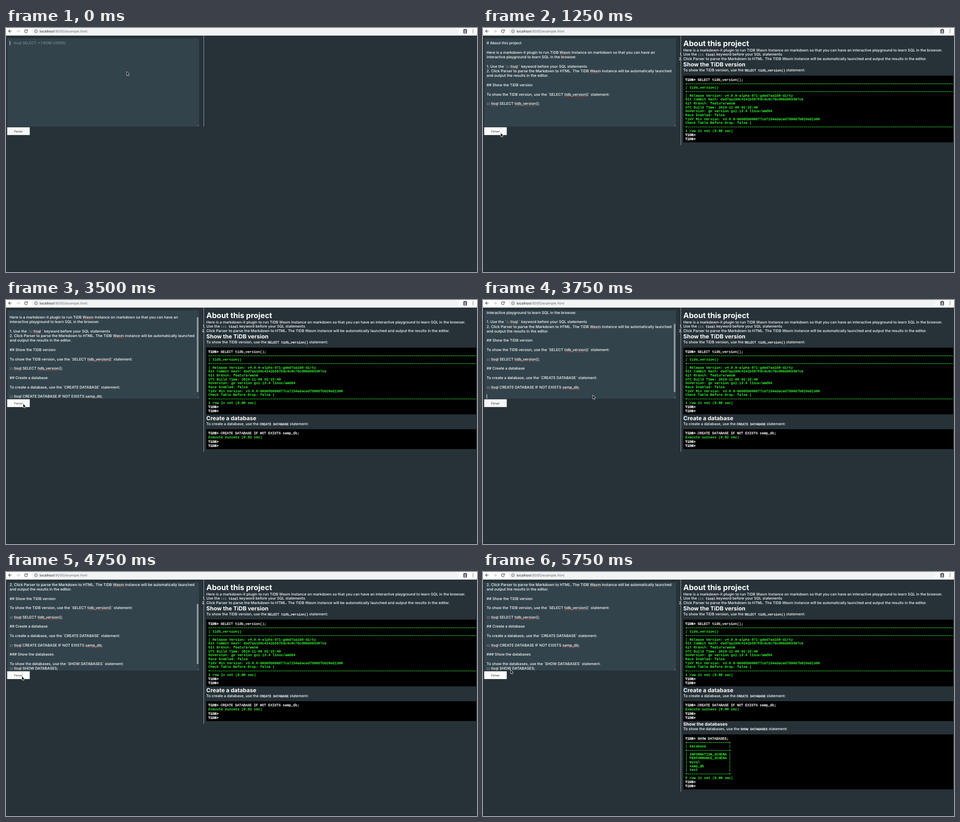
Write an HTML page with a canvas that moves like this. It is 1037 px wide and 540 px high and loops after 6 s.

```html
<!DOCTYPE html>
<html lang="en">
<head>
<meta charset="utf-8">
<title>Markdown SQL playground</title>
<style>
html, body { margin: 0; width: 100%; height: 100%; overflow: hidden; background: #263238; }
canvas { display: block; width: 1037px; height: 540px; }
</style>
</head>
<body>
<canvas id="stage"></canvas>
<script>
const W = 1037, H = 540, LOOP = 6000;
const canvas = document.getElementById('stage');
const ctx = canvas.getContext('2d');
const dpr = window.devicePixelRatio || 1;
canvas.width = W * dpr;
canvas.height = H * dpr;

const SANS = 'Inter, "Open Sans", sans-serif';
const MONO = '"Liberation Mono", "Courier New", monospace';
const BODY = `500 8.2px ${SANS}`;
const CODE = `7.1px ${MONO}`;
const TERM = `7.6px ${MONO}`;
const CHAR = 4.56;
const GREEN = '#33f533';

const SOURCE = `# About this project

Here is a markdown-it plugin to run TiDB Wasm Instance on markdown so that you can have an
interactive playground to learn SQL in the browser.

1. Use the \`::: tisql \` keyword before your SQL statements
2. Click Parser to parse the Markdown to HTML. The TiDB Wasm instance will be automatically launched
and output the results in the editor.

## Show the TiDB version

To show the TiDB version, use the \`SELECT tidb_version()\` statement:

::: tisql SELECT tidb_version();

## Create a database

To create a database, use the \`CREATE DATABASE\` statement:

::: tisql CREATE DATABASE IF NOT EXISTS samp_db;

### Show the databases

To show the databases, use the \`SHOW DATABASES\` statement:
::: tisql SHOW DATABASES;`.split('\n');

const WIDE_RULE = '+' + '-'.repeat(135);
const VERSION_ROWS = [
  WIDE_RULE,
  '| tidb_version()',
  WIDE_RULE,
  '| Release Version: v4.0.0-alpha-671-gded7aa198-dirty',
  'Git Commit Hash: ded7aa198c4141b56759c4c0c78cd09d963387ce',
  'Git Branch: feature/wasm',
  'UTC Build Time: 2019-11-08 02:15:40',
  'GoVersion: go version go1.13.4 linux/amd64',
  'Race Enabled: false',
  'TiKV Min Version: v3.0.0-60965b006877ca7234adaced7890d7b029ed1306',
  'Check Table Before Drop: false |',
  WIDE_RULE,
  '1 row in set (0.00 sec)'
];
const RULE = '+' + '-'.repeat(20) + '+';
const cell = s => `| ${s.padEnd(18)} |`;
const DATABASE_ROWS = [
  RULE, cell('Database'), RULE,
  ...['INFORMATION_SCHEMA', 'PERFORMANCE_SCHEMA', 'mysql', 'samp_db', 'test'].map(cell),
  RULE, '5 row in set (0.00 sec)'
];

// lines: editor lines present; blank: the last of them is still empty
const STATES = [
  { at: 0, lines: 0, caret: true, pointer: [266, 97], sections: 0 },
  { at: 250, lines: 8, caret: true, pointer: [262, 58], sections: 0 },
  { at: 750, lines: 14, caret: true, pointer: [221, 151], sections: 0 },
  { at: 1000, lines: 14, caret: true, pointer: [46, 214], sections: 0 },
  { at: 1250, lines: 14, pointer: [39, 232.5], sections: 1, pressed: true },
  { at: 3000, lines: 14, caret: true, pointer: [165.5, 181], sections: 1 },
  { at: 3500, lines: 20, pointer: [38, 230], sections: 2, pressed: true, bar: true },
  { at: 3750, lines: 22, blank: true, caret: true, pointer: [242, 211], sections: 2, bar: true },
  { at: 4250, lines: 25, caret: true, pointer: [242, 211], sections: 2, bar: true },
  { at: 4500, lines: 25, caret: true, pointer: [212, 210.5], sections: 2, bar: true },
  { at: 4750, lines: 25, pointer: [35, 231], sections: 2, pressed: true, bar: true },
  { at: 5000, lines: 25, pointer: [35, 231], sections: 3, pressed: true },
  { at: 5750, lines: 25, pointer: [60.8, 217], sections: 3, pressed: true }
];

function rect(x, y, w, h, color) {
  ctx.fillStyle = color;
  ctx.fillRect(x, y, w, h);
}

function text(str, x, y, font = BODY, color = '#fff', align = 'left') {
  ctx.font = font;
  ctx.fillStyle = color;
  ctx.textAlign = align;
  ctx.fillText(str, x, y);
}

// Monospace text is slightly thickened, between regular and bold.
function code(str, x, y, font = TERM, color = '#fff') {
  text(str, x, y, font, color);
  ctx.strokeStyle = color;
  ctx.lineWidth = 0.3;
  ctx.strokeText(str, x, y);
}

function widthOf(str, font = BODY) {
  ctx.font = font;
  return ctx.measureText(str).width;
}

function path(points, color, width = 1, dash = []) {
  ctx.beginPath();
  points.forEach(([x, y]) => ctx.lineTo(x, y));
  ctx.strokeStyle = color;
  ctx.lineWidth = width;
  ctx.setLineDash(dash);
  ctx.stroke();
  ctx.setLineDash([]);
}

function circle(x, y, r, color, width, from = 0, to = Math.PI * 2) {
  ctx.beginPath();
  ctx.arc(x, y, r, from, to);
  ctx.fillStyle = ctx.strokeStyle = color;
  ctx.lineWidth = width;
  width ? ctx.stroke() : ctx.fill();
}

function arrow(x, dir, color) {
  path([[x - 3.4, 7], [x + 3.4, 7]], color, 1.1);
  path([[x, 3.6], [x + dir * 3.4, 7], [x, 10.4]], color, 1.1);
}

function toolbar() {
  rect(0, 0, W, 17, '#fff');
  ctx.beginPath();
  ctx.roundRect(56, -1, 941, 14.5, 7);
  ctx.fillStyle = '#f1f3f4';
  ctx.fill();
  rect(0, 16, W, 1, '#c4c8ca');
  arrow(9, -1, '#4a4d51');
  arrow(26.5, 1, '#c3c5c8');
  circle(44, 7, 3.2, '#4a4d51', 1.1, 0.4, 5.5);
  path([[47.4, 3], [47.4, 6.2], [44.2, 6.2]], '#4a4d51', 1.1);
  circle(66, 7, 3.4, '#55585c', 0.9);
  rect(65.6, 6.4, 0.9, 2.6, '#55585c');
  rect(65.6, 4.9, 0.9, 0.9, '#55585c');
  const font = `7.65px ${SANS}`;
  text('localhost', 74, 9.8, font, '#24272a');
  text(':8000/example.html', 74 + widthOf('localhost', font), 9.8, font, '#6b6f74');
  rect(1007, 3, 8, 9, '#4a4d51');
  rect(1009.5, 2, 3, 2, '#4a4d51');
  circle(1011, 6.2, 1.4, '#fff');
  rect(1008.7, 8.6, 4.6, 1.7, '#fff');
  [3.7, 7, 10.3].forEach(y => circle(1028.3, y, 0.9, '#4a4d51'));
}

function squiggle(x, y, width) {
  path([[x, y], [x + width, y]], '#e0423f', 1, [1.3, 0.7]);
}

function editor(s) {
  rect(3, 23, 422, 195, '#32434b');
  ctx.save();
  ctx.beginPath();
  ctx.rect(3, 23, 422, 195);
  ctx.clip();

  const scroll = Math.max(0, 10.32 * (s.lines - 1) - 180.1);
  const lineY = i => 36.2 + 10.32 * i - scroll;
  const lines = SOURCE.slice(0, s.lines);
  if (s.blank) lines[s.lines - 1] = '';
  lines.forEach((line, i) => {
    text(line, 8, lineY(i));
    for (const m of line.matchAll(/tisql|Wasm|tidb_version|samp_db/g)) {
      squiggle(8 + widthOf(line.slice(0, m.index)), lineY(i) + 1.9, widthOf(m[0]));
    }
  });
  if (!s.lines) text('::: tisql SELECT * FROM USERS;', 8, lineY(0), BODY, '#7d888b');
  if (s.caret) {
    const last = Math.max(0, s.lines - 1);
    rect(8 + widthOf(lines[last] || ''), lineY(last) - 7.7, 0.9, 9.6, '#fff');
  }
  if (s.bar) {
    const top = 24 + 180 * scroll / (195 + scroll);
    ctx.beginPath();
    ctx.roundRect(420, top, 3.8, 204 - top, 1.9);
    ctx.fillStyle = '#8d979b';
    ctx.fill();
  }
  path([[421, 217.5], [424.5, 214]], '#8d979b', 0.6);
  path([[423, 217.5], [424.5, 216]], '#8d979b', 0.6);
  ctx.restore();

  rect(2.6, 219.7, 49.7, 17.2, s.pressed ? '#fff' : '#f5f7f7');
  text('Parser', 27.4, 230.8, `6.1px ${SANS}`, '#222', 'center');
}

function heading(str, y, size) {
  text(str, 441, y, `bold ${size}px ${SANS}`);
}

// Backticks switch to the inline code font.
function paragraph(str, y, marker) {
  if (marker) text(marker, 438.8, y, BODY, '#fff', 'right');
  let x = 441;
  str.split('`').forEach((part, i) => {
    const font = i % 2 ? CODE : BODY;
    (i % 2 ? code : text)(part, x, y, font);
    x += widthOf(part, font);
  });
}

function terminalRow(row, y) {
  const isRule = row.startsWith('+');
  code(isRule ? row.replaceAll('-', ' ') : row, 445.6, y + 2.3, TERM, GREEN);
  if (!isRule) return;
  const count = row.split('-').length - 1;
  const x = 445.6 + CHAR;
  path([[x + 0.4, y + 0.3], [x + count * CHAR, y + 0.3]], GREEN, 1, [CHAR - 0.9, 0.9]);
}

function terminal(top, command, rows) {
  const lastRow = top + 18 + 8.68 * (rows.length - 1);
  const bottom = lastRow + 25.9;
  ctx.save();
  ctx.beginPath();
  ctx.rect(441, top, 594, bottom - top);
  ctx.clip();
  rect(441, top, 594, bottom - top, '#000');
  [top + 9, lastRow + 9.6, lastRow + 18.3].forEach(y => code('TiDB>', 445.2, y + 2.3, `bold ${TERM}`));
  code(command, 445.2 + 6 * CHAR, top + 11.3);
  rows.forEach((row, i) => terminalRow(row, top + 18 + 8.68 * i));
  ctx.restore();
}

function preview(count) {
  rect(435, 17, 1, [201, 242, 319, 469][count], '#98a1a4');
  if (count > 0) {
    heading('About this project', 39.6, 16.6);
    paragraph('Here is a markdown-it plugin to run TiDB Wasm Instance on markdown so that you can have an interactive playground to learn SQL in the browser.', 51.5);
    paragraph('Use the `::: tisql` keyword before your SQL statements', 61.3, '1.');
    paragraph('Click Parser to parse the Markdown to HTML. The TiDB Wasm instance will be automatically launched and output the results in the editor.', 71.2, '2.');
    heading('Show the TiDB version', 85, 12.45);
    paragraph('To show the TiDB version, use the `SELECT tidb_version()` statement:', 96.2);
    terminal(105.2, 'SELECT tidb_version();', VERSION_ROWS);
  }
  if (count > 1) {
    heading('Create a database', 266, 12.45);
    paragraph('To create a database, use the `CREATE DATABASE` statement:', 276.7);
    terminal(286, 'CREATE DATABASE IF NOT EXISTS samp_db;',
      [`Execute success (${count > 2 ? '0.00' : '0.02'} sec)`]);
  }
  if (count > 2) {
    heading('Show the databases', 340, 9.9);
    paragraph('To show the databases, use the `SHOW DATABASES` statement:', 350.2);
    terminal(359.2, 'SHOW DATABASES;', DATABASE_ROWS);
  }
}

function pointer(x, y) {
  ctx.beginPath();
  [[0, 0], [0, 7.6], [1.8, 6], [3, 8.8], [4.3, 8.2], [3.1, 5.5], [5.5, 5.4]]
    .forEach(([dx, dy]) => ctx.lineTo(x + dx, y + dy));
  ctx.closePath();
  ctx.strokeStyle = '#fff';
  ctx.lineWidth = 1.3;
  ctx.stroke();
  ctx.fillStyle = '#111';
  ctx.fill();
}

function draw(time) {
  const t = time % LOOP;
  const state = STATES.findLast(s => s.at <= t);
  ctx.setTransform(dpr, 0, 0, dpr, 0, 0);
  ctx.textRendering = 'geometricPrecision';
  ctx.lineJoin = 'round';
  rect(0, 0, W, H, '#263238');
  rect(0, 538, W, 2, '#202b31');
  toolbar();
  editor(state);
  preview(state.sections);
  pointer(...state.pointer);
}

const start = performance.now();
function tick() {
  draw(performance.now() - start);
  requestAnimationFrame(tick);
}
tick();
</script>
</body>
</html>
```
